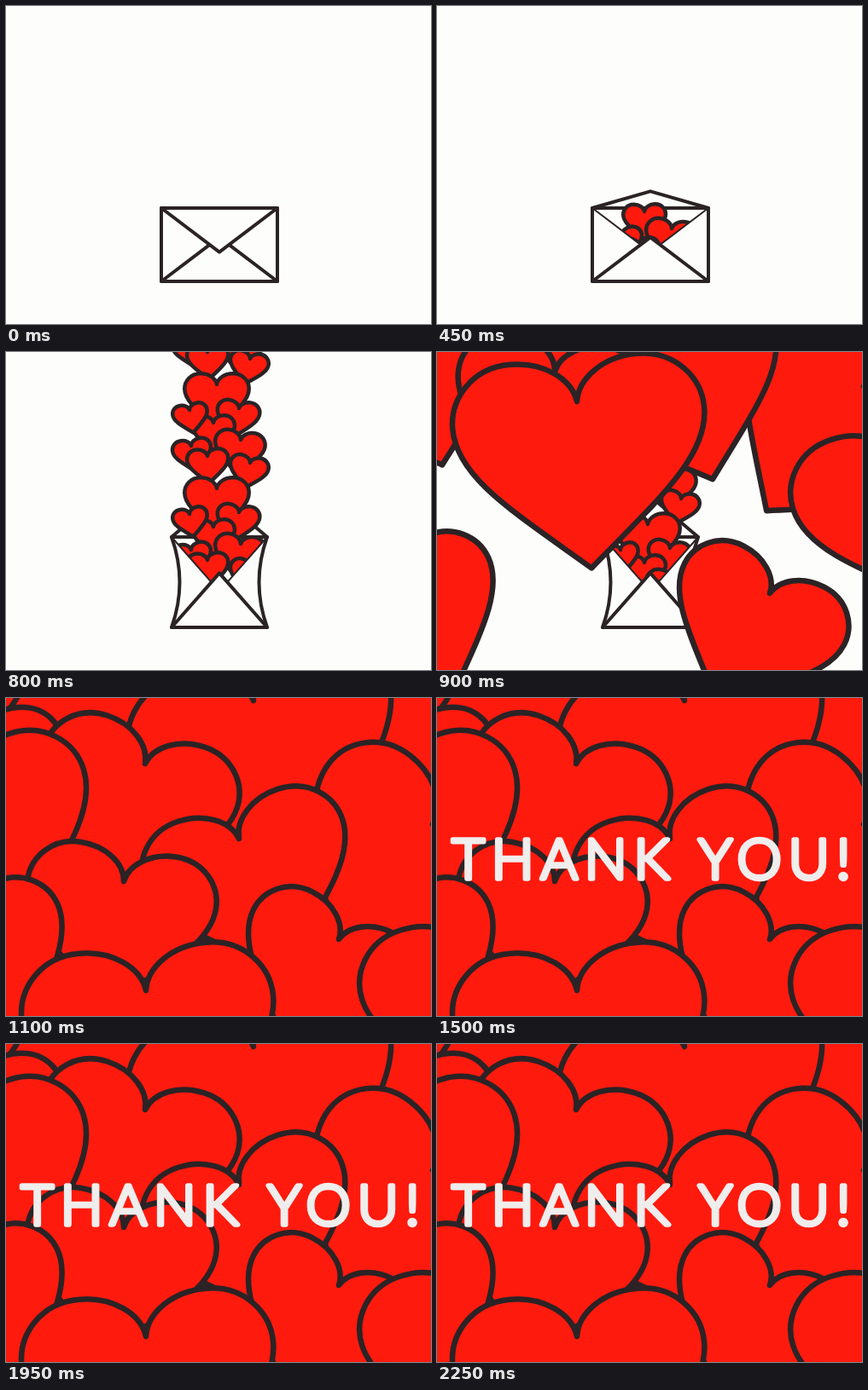
Write an HTML page with a canvas that moves like this. It is 498x373 px and loops after 2.3 s.

```html
<!DOCTYPE html>
<html>
<head>
<meta charset="utf-8">
<style>
  html, body { margin: 0; width: 100%; height: 100%; overflow: hidden; background: #fdfefc; }
  canvas { display: block; }
</style>
</head>
<body>
<canvas id="stage" width="498" height="373"></canvas>
<script>
const ctx = document.getElementById('stage').getContext('2d');
const PAPER = '#fdfefc', RED = '#ff1a0e', INK = '#2b2325';
const LOOP = 2300, STEP = 50, CX = 250, BOTTOM = 323;
const DROP = 800, COVERED = 1100;

// Unit heart: cleft at the origin, tip at (0, 1)
const HEART = new Path2D(
  'M0 0C.02 -.14 .18 -.255 .38 -.255C.61 -.255 .755 -.08 .755 .1C.755 .39 .44 .62 0 1' +
  'C-.44 .62 -.755 .39 -.755 .1C-.755 -.08 -.61 -.255 -.38 -.255C-.18 -.255 -.02 -.14 0 0Z');

// One bunch of the rising column: x offset, y, size
const BUNCH = [
  [0, 0, 50], [26, 28, 33], [-4, 45, 33], [-32, 30, 27],
  [28, 65, 39], [-30, 72, 30], [-11, 84, 32], [39, 92, 30]
];
const BUNCH_HEIGHT = 122, RISE = .8;

// Big hearts, back to front: x, y, size, degrees, landing time
const BIG = [
  [-90, -50, 150, 0, 1060], [-31, 44, 130, 0, 1060],
  [290, 3, 210, -18, 1060], [163, 77, 157, 18, 1060],
  [500, 148, 185, 38, 925], [-48, 107, 185, -17, 945],
  [273, 165, 162, -18, 945], [138, 215, 148, 9, 945],
  [-49, 275, 150, -25, 900], [390, 283, 139, 27, 900],
  [541, 295, 180, -18, 925], [164, 343, 196, -5, 945]
];

const ramp = (t, from, to) => Math.max(0, Math.min(1, (t - from) / (to - from)));
const rad = deg => deg * Math.PI / 180;

function heart(x, y, size, deg, line) {
  ctx.save();
  ctx.translate(x, y);
  ctx.rotate(rad(deg));
  ctx.scale(size, size);
  ctx.lineWidth = line / size;
  ctx.fill(HEART);
  ctx.stroke(HEART);
  ctx.restore();
}

function trace(points, close) {
  ctx.beginPath();
  points.forEach(p => ctx.lineTo(...p));
  if (close) ctx.closePath();
}

function shape(points) {
  trace(points, true);
  ctx.lineWidth = 4;
  ctx.fill();
  ctx.stroke();
}

function column(t) {
  ctx.fillStyle = RED;
  for (let base = 38 - BUNCH_HEIGHT; base < 300; base += BUNCH_HEIGHT) {
    for (const [dx, dy, size] of BUNCH) {
      const y = base + dy;
      if (y > -42) heart(247 + dx, y + (DROP - t) * RISE, size, dx * .3, 4.5);
    }
  }
}

function envelope(t) {
  const squash = ramp(t, 100, 200) * (1 - ramp(t, 300, 450));
  const pinch = ramp(t, 450, 650);
  const half = 68 + 16 * squash - 12 * pinch;
  const side = 68 + 36 * squash - 31 * pinch;
  const top = 237 + 23 * squash - 20 * pinch;
  const flap = .6 - 1.05 * ramp(t, 300, 490);

  const left = CX - half, right = CX + half;
  const level = share => top + share * (BOTTOM - top);
  const lid = [[left, top], [CX, level(flap)], [right, top]];
  const mouth = [[left, top], [CX, level(.6)], [right, top]];
  const body = new Path2D(
    `M${left} ${top}Q${CX - side} ${level(.5)} ${left} ${BOTTOM}` +
    `H${right}Q${CX + side} ${level(.5)} ${right} ${top}`);

  ctx.fillStyle = PAPER;
  ctx.fill(body);
  if (flap < 0) shape(lid);

  // Contents show only above the rim and inside the mouth
  if (t >= 350) {
    ctx.save();
    trace(mouth, true);
    ctx.rect(0, 0, 498, top);
    ctx.clip();
    column(t);
    ctx.restore();
  }

  ctx.fillStyle = PAPER;
  trace(mouth);
  ctx.lineWidth = 2;
  ctx.stroke();
  shape([[left, BOTTOM], [CX, level(.4)], [right, BOTTOM]]);
  if (flap >= 0) shape(lid);
  ctx.lineWidth = 4;
  ctx.stroke(body);
}

// Each heart accelerates from just above the stage to its place
function bigHearts(t) {
  ctx.fillStyle = RED;
  for (const [x, y, size, deg, land] of BIG) {
    const height = y + size * Math.cos(rad(deg)) + 5;
    heart(x, y - height * (1 - ramp(t, DROP, land) ** 2), size, deg, 6.5);
  }
}

function message(t) {
  ctx.save();
  ctx.globalAlpha = ramp(t, 1200, 1450);
  ctx.font = '300 66px Lato, sans-serif';
  ctx.letterSpacing = '8px';
  ctx.textAlign = 'center';
  ctx.fillStyle = ctx.strokeStyle = '#f0eded';
  ctx.lineWidth = 5.5;
  ctx.strokeText('THANK YOU!', 255, 212);
  ctx.fillText('THANK YOU!', 255, 212);
  ctx.restore();
}

function draw(now) {
  const t = Math.floor(now % LOOP / STEP) * STEP;
  ctx.fillStyle = t < COVERED ? PAPER : RED;
  ctx.fillRect(0, 0, 498, 373);
  ctx.strokeStyle = INK;
  ctx.lineJoin = ctx.lineCap = 'round';
  if (t < COVERED) envelope(t);
  if (t >= DROP) bigHearts(t);
  if (t > 1200) message(t);
}

const begin = performance.now();
function frame() {
  draw(performance.now() - begin);
  requestAnimationFrame(frame);
}
frame();
</script>
</body>
</html>
```
